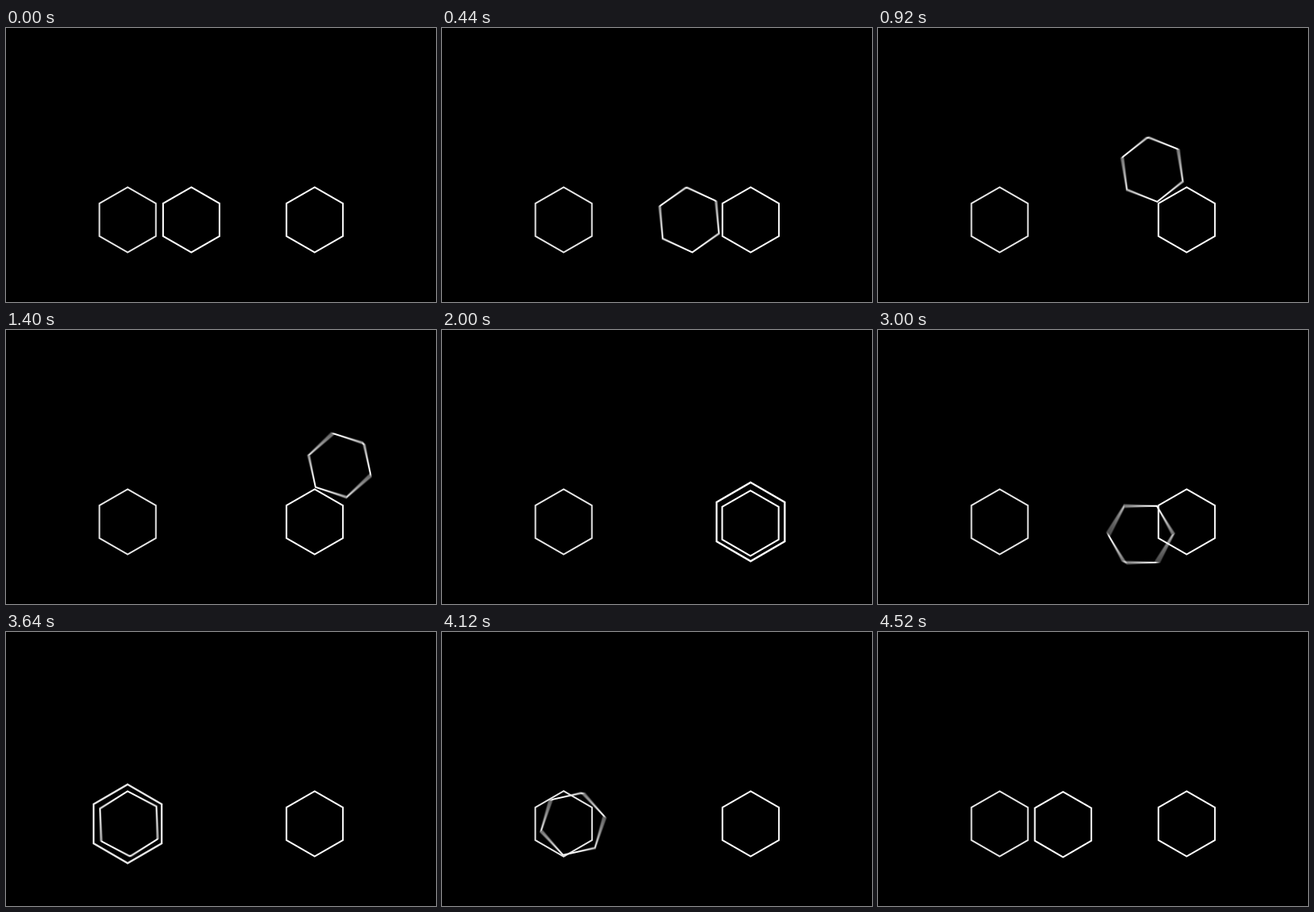
An HTML page with a canvas for the animation above (4640 ms loop, 550 by 350 pixels).

```html
<!DOCTYPE html>
<html lang="en">
<head>
<meta charset="utf-8">
<title>Rolling hexagon</title>
<style>
  html, body { margin: 0; width: 100%; height: 100%; overflow: hidden; background: #000; }
  canvas { display: block; }
</style>
</head>
<body>
<canvas id="stage" width="550" height="350"></canvas>
<script>
const ctx = document.getElementById('stage').getContext('2d');
const LOOP = 4640, STEP = 40, LAST = 4520;
const SHUTTER = 20, SAMPLES = 10;
const RADIUS = 41.7, SWELL = 9;
const REACH = 43.2;                       // centre to pivot while rolling
const HALF = REACH * Math.sqrt(3) / 2;
const RAD = Math.PI / 180;

const left = { x: 155.6, y: 245 };
const right = { x: 394.8, y: 245 };
const home = { x: 237, y: 245 };
const beside = { x: right.x - 2 * HALF, y: 245 };
const above = { x: right.x + HALF, y: 245 - 1.5 * REACH };
const landing = { x: 394.5, y: 246.8 };
const parked = { x: 236.7, y: 245.8 };

const cornerLeft = { x: right.x - HALF, y: 245 - REACH / 2 };
const cornerTop = { x: right.x, y: 245 - REACH };

function ease(t, start, end) {
  const u = Math.min(1, Math.max(0, (t - start) / (end - start)));
  return u * u * (3 - 2 * u);
}

const slide = (from, to, turn) => p => ({
  x: from.x + (to.x - from.x) * p,
  y: from.y + (to.y - from.y) * p,
  turn: turn * p
});

// Clockwise swing of 120 degrees about a corner; angles run from the x axis.
const swing = (corner, startAngle) => p => {
  const a = (startAngle + 120 * p) * RAD;
  return {
    x: corner.x + REACH * Math.cos(a),
    y: corner.y + REACH * Math.sin(a),
    turn: 120 * p
  };
};

const moves = [
  { start: 0, end: 503, at: slide(home, beside, 120) },
  { start: 503, end: 1000, at: swing(cornerLeft, 150) },
  { start: 1000, end: 1498, at: swing(cornerTop, 210) },
  { start: 1505, end: 2000, at: slide(above, landing, 0) },
  { start: 2040, end: 2500, at: slide(landing, right, 0) },
  { start: 2662, end: 3165, at: swing(cornerLeft, 30) },
  { start: 3165, end: 3668, at: slide(beside, left, 240) },
  { start: 4000, end: 4500, at: slide(left, parked, 120) }
];

function roller(t) {
  let move = moves[0];
  for (const m of moves) if (t >= m.start) move = m;
  return move.at(ease(t, move.start, move.end));
}

function pulse(t, start, peak, end) {
  return RADIUS + SWELL * (ease(t, start, peak) - ease(t, peak, end));
}

function hexagon(x, y, radius, turn, color) {
  ctx.beginPath();
  for (let i = 0; i < 6; i++) {
    const a = (turn + 60 * i - 90) * RAD;
    ctx.lineTo(x + radius * Math.cos(a), y + radius * Math.sin(a));
  }
  ctx.closePath();
  ctx.lineWidth = 2 * radius / RADIUS;
  ctx.strokeStyle = color;
  ctx.stroke();
}

function drawRoller(t) {
  ctx.globalCompositeOperation = 'lighter';
  ctx.globalAlpha = 1 / SAMPLES;
  for (let i = 0; i < SAMPLES; i++) {
    const offset = ((i + 0.5) / SAMPLES - 0.5) * SHUTTER;
    const h = roller(t + offset);
    hexagon(h.x, h.y, RADIUS, h.turn, '#fff');
  }
  ctx.globalAlpha = 1;
  ctx.globalCompositeOperation = 'source-over';
}

function draw(t) {
  ctx.fillStyle = '#000';
  ctx.fillRect(0, 0, 550, 350);
  drawRoller(t);
  hexagon(left.x, left.y, pulse(t, 3440, 3670, 4160), 0, '#e6e6e6');
  hexagon(right.x, right.y, pulse(t, 1790, 2030, 2520), 0, '#fff');
}

const begin = performance.now();
function tick() {
  const t = (performance.now() - begin) % LOOP;
  draw(Math.min(LAST, Math.floor(t / STEP) * STEP));
  requestAnimationFrame(tick);
}
tick();
</script>
</body>
</html>
```
